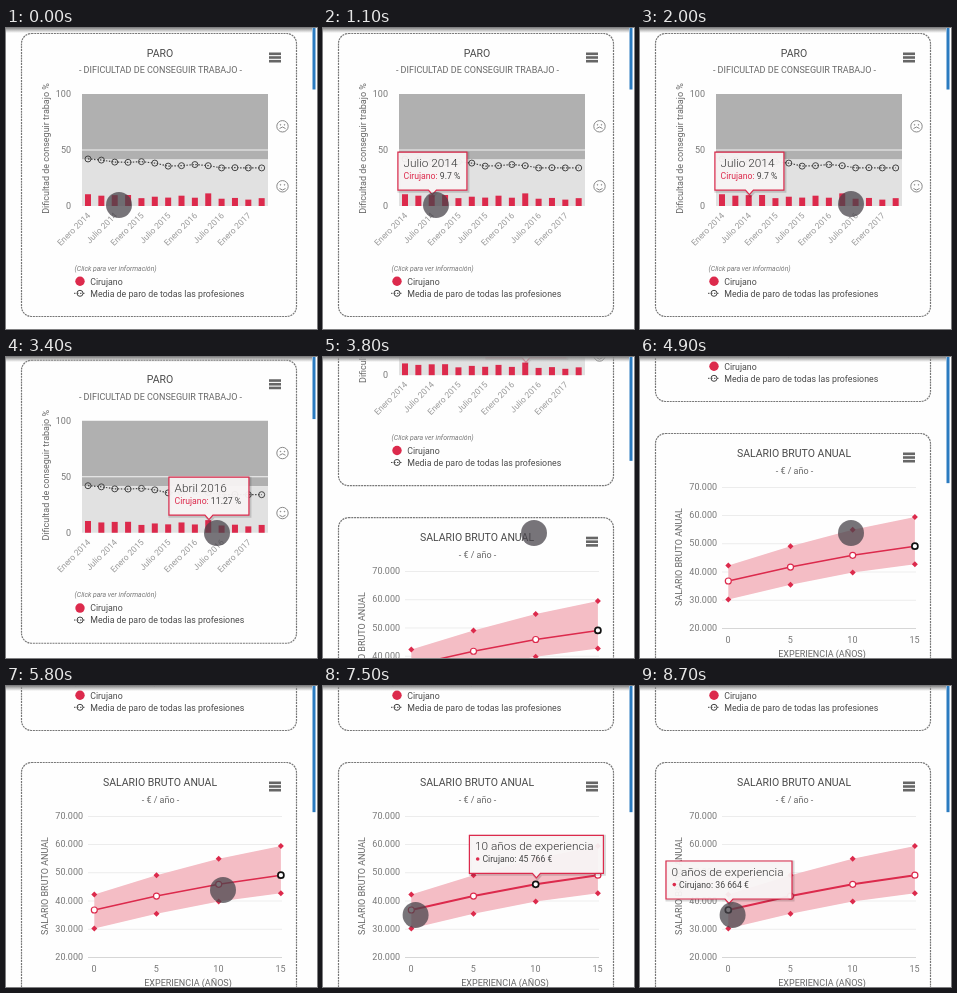
An HTML page for the animation above (8800 ms loop, 311 by 301 pixels).

```html
<!DOCTYPE html>
<html lang="es">
<head>
<meta charset="utf-8">
<title>Paro y salario</title>
<style>
html, body { margin: 0; width: 100%; height: 100%; overflow: hidden; background: #fefefe; }
svg { display: block; width: 311px; height: 301px; }
text { font: 9px Roboto, Arial, sans-serif; fill: #666; white-space: pre; }
.title { font-size: 10.5px; fill: #4a4a4a; }
.axis { fill: #777; }
.small { font-size: 8.8px; fill: #4a4a4a; }
.hint { font-size: 6.9px; font-style: italic; fill: #777; }
.slant { font-size: 8.5px; fill: #999; }
.head { font-size: 11.8px; font-weight: 300; fill: #333; }
.line { font-size: 8.7px; fill: #444; }
.card { fill: #fefefe; stroke: #777; stroke-width: 1.2; stroke-dasharray: 2 .8; }
</style>
</head>
<body>
<svg viewBox="0 0 311 301">
  <defs>
    <linearGradient id="shade" x2="0" y2="1">
      <stop stop-color="#888"/>
      <stop offset="1" stop-color="#999" stop-opacity="0"/>
    </linearGradient>
  </defs>
  <g id="page"><g id="charts"></g><g id="tips"></g></g>
  <rect width="306" height="5" fill="url(#shade)"/>
  <rect id="thumb" x="306.5" width="3" fill="#2b7bc0"/>
  <circle id="pointer" r="13" fill="#48434a" fill-opacity=".74"/>
</svg>
<script>
const LOOP = 8800, RED = '#dc2a4c', CARD2 = 320;
const $ = id => document.getElementById(id);
const label = (x, y, s, cls = '', anchor = 'start', turn = 0) =>
  `<text class="${cls}" text-anchor="${anchor}" transform="translate(${x} ${y}) rotate(${turn})">${s}</text>`;
const rect = (x, y, w, h, fill) => `<rect x="${x}" y="${y}" width="${w}" height="${h}" fill="${fill}"/>`;
const ring = (x, y, r, stroke, fill = 'none', w = 1) =>
  `<circle cx="${x}" cy="${y}" r="${r}" stroke="${stroke}" fill="${fill}" stroke-width="${w}"/>`;
const path = (d, attrs) => `<path d="${d}" ${attrs}/>`;
const poly = pts => 'M' + pts.map(p => p.join(' ')).join('L');

const card = (y, h) => `<rect class="card" x="15.5" y="${y + .5}" width="275" height="${h}" rx="10"/>` +
  [0, 3.7, 7.4].map(d => rect(263, y + 19.5 + d, 12, 2.6, '#666')).join('');

function face(y, mouth) {
  return ring(276.5, y, 5.7, '#888') + ring(274.5, y - 1.5, .5, '#888', '#888', .5) +
    ring(278.5, y - 1.5, .5, '#888', '#888', .5) +
    path(`M273.5 ${y + 2.2}q3 ${mouth} 6 0`, 'fill="none" stroke="#888"');
}

// Unemployment chart
const rates = [10.5, 9.2, 9.7, 9.8, 7, 8.3, 7.5, 9.2, 7.4, 11.27, 6.5, 7.2, 5.7, 7];
const means = [42, 41, 39.2, 39, 39.6, 38.3, 35.6, 36, 37, 36, 34, 34.2, 34, 34];
const barX = i => 82 + 13.36 * i;
const rateY = v => 178 - 1.12 * v;

function jobChart() {
  const dots = means.map((v, i) => [barX(i), rateY(v)]);
  let s = card(5, 283) + label(154, 28.5, 'PARO', 'title', 'middle') +
    label(154.5, 45, '- DIFICULTAD DE CONSEGUIR TRABAJO -', '', 'middle') +
    label(43, 120.5, 'Dificultad de conseguir trabajo %', '', 'middle', -90) +
    rect(76, 66, 186, 65.5, '#b0b0b0') + rect(76, 131.5, 186, 46.5, '#e1e1e1') +
    rect(76, 121.5, 186, 1, '#f4f4f4') +
    [100, 50, 0].map(v => label(65, rateY(v) + 3, v, 'axis', 'end')).join('') +
    face(98.3, -3) + face(158.3, 3);
  rates.forEach((v, i) => {
    s += rect(barX(i) - 3, rateY(v), 6, 1.12 * v, RED);
    if (i % 2 == 0 && i < 13)
      s += label(barX(i) + 3, 188, (i % 4 ? 'Julio ' : 'Enero ') + (2014 + (i >> 2)), 'slant', 'end', -45);
  });
  s += path(poly(dots), 'fill="none" stroke="#444" stroke-width="1.2" stroke-dasharray="1.5 1.5"');
  s += dots.map(p => ring(...p, 3, '#444')).join('');
  return s + label(68.5, 242.5, '(Click para ver información)', 'hint') +
    ring(74, 253.3, 4.7, 'none', RED) + label(84.2, 256.5, 'Cirujano', 'small') +
    path('M68 265.3H80', 'stroke="#444" stroke-dasharray="1.5 1.5"') +
    ring(74, 265.3, 3, '#444') + label(84.2, 268.5, 'Media de paro de todas las profesiones', 'small');
}

// Salary chart
const payX = i => 88.3 + 62.2 * i;
const payY = v => CARD2 + 54 + (70 - v) * 2.82;
const pay = [36.664, 41.6, 45.766, 49];
const high = [42.2, 49, 54.8, 59.4], low = [30.1, 35.3, 39.7, 42.6];
const curve = list => list.map((v, i) => [payX(i), payY(v)]);

function payChart() {
  let s = card(CARD2, 283) + label(154, CARD2 + 24, 'SALARIO BRUTO ANUAL', 'title', 'middle') +
    label(154.5, CARD2 + 41, '- € / año -', '', 'middle') +
    label(42, CARD2 + 124, 'SALARIO BRUTO ANUAL', '', 'middle', -90) +
    label(182, CARD2 + 223.5, 'EXPERIENCIA (AÑOS)', '', 'middle');
  for (let v = 70; v >= 20; v -= 10)
    s += rect(82, payY(v), 194, .8, v > 20 ? '#e8e8e8' : '#ccc') + label(77, payY(v) + 3, v + '.000', 'axis', 'end');
  s += path(poly([...curve(high), ...curve(low).reverse()]) + 'Z', 'fill="#f4bdc5"');
  for (const [x, y] of [...curve(high), ...curve(low)])
    s += path(`M${x} ${y - 3}l3 3l-3 3l-3-3z`, `fill="${RED}"`);
  s += path(poly(curve(pay)), `id="payLine" fill="none" stroke="${RED}"`) + '<g id="marks"></g>';
  return s + [0, 5, 10, 15].map((v, i) => label(payX(i) - .3, CARD2 + 209.5, v, 'axis', 'middle')).join('');
}

$('charts').innerHTML = jobChart() + payChart();

// Time helpers
const clamp = v => Math.max(0, Math.min(1, v));
const ramp = (t, a, b) => clamp((t - a) / (b - a));
const ease = (t, a, b) => { const k = ramp(t, a, b); return k * k * (3 - 2 * k); };
const mix = (a, b, k) => a + (b - a) * k;

const rateTip = (i, head, w) => ({
  x: barX(i), y: rateY(rates[i]), w, head,
  body: label(5.6, 26.6, `<tspan fill="${RED}">Cirujano:</tspan> ${rates[i]} %`, 'line')
});
const payTip = (i, years, w, sum) => ({
  x: payX(i), y: payY(pay[i]) - 6, w, head: years + ' años de experiencia',
  body: ring(8.3, 23.6, 1.8, 'none', RED) + label(13, 26.6, `Cirujano: ${sum} €`, 'line')
});
const jobTips = [rateTip(2, 'Julio 2014', 69), rateTip(9, 'Abril 2016', 80)];
const payTips = [payTip(2, 10, 134, '45 766'), payTip(0, 0, 126, '36 664')];

function tooltip([a, b], slide, alpha) {
  if (!alpha) return '';
  const x = mix(a.x, b.x, slide), y = mix(a.y, b.y, slide), w = mix(a.w, b.w, slide), tip = slide ? b : a;
  const box = `M0 0H${w}V38H${w / 2 + 4}l-4 4.5l-4-4.5H0Z`;
  return `<g opacity="${alpha}" transform="translate(${x + .7 - w / 2} ${y - 43})">` +
    path(box, 'transform="translate(1 1)" fill="none" stroke="#000" stroke-opacity=".15" stroke-width="3"') +
    path(box, `fill="#f8f5f5" fill-opacity=".94" stroke="${RED}" stroke-width="1.2"`) +
    label(5.6, 14.5, tip.head, 'head') + tip.body + '</g>';
}

// Pointer moves: start, end, x, y
const moves = [[1250, 1900, 211, 176], [5100, 5750, 217, 204], [6450, 7300, 92.6, 229]];

function draw(now) {
  const t = now % LOOP;
  const scroll = 240 * ease(t, 3360, 4080) + 4 * ramp(t, 4250, 4500);
  let x = 113, y = 177;
  for (const [a, b, toX, toY] of moves) {
    const k = ease(t, a, b);
    x = mix(x, toX, k);
    y = mix(y, toY, k);
  }
  $('pointer').setAttribute('transform', `translate(${x} ${y})`);
  $('page').setAttribute('transform', `translate(0 ${-scroll})`);
  $('thumb').setAttribute('height', 61.5 + scroll * .265);

  const active = t < 6000 ? 3 : t < 8200 ? 2 : 0;
  $('payLine').setAttribute('stroke-width', active == 3 ? 1.5 : 2);
  $('marks').innerHTML = curve(pay).map((p, i) =>
    ring(...p, 3, i == active ? '#111' : RED, '#fff', i == active ? 1.7 : 1.2)).join('');
  $('tips').innerHTML =
    tooltip(jobTips, ease(t, 2300, 2600), ramp(t, 400, 600) * (1 - ramp(t, 3700, 3900))) +
    tooltip(payTips, ease(t, 8200, 8450), ramp(t, 6000, 6150));
}

const start = performance.now();
(function frame() {
  draw(performance.now() - start);
  requestAnimationFrame(frame);
})();
</script>
</body>
</html>
```
